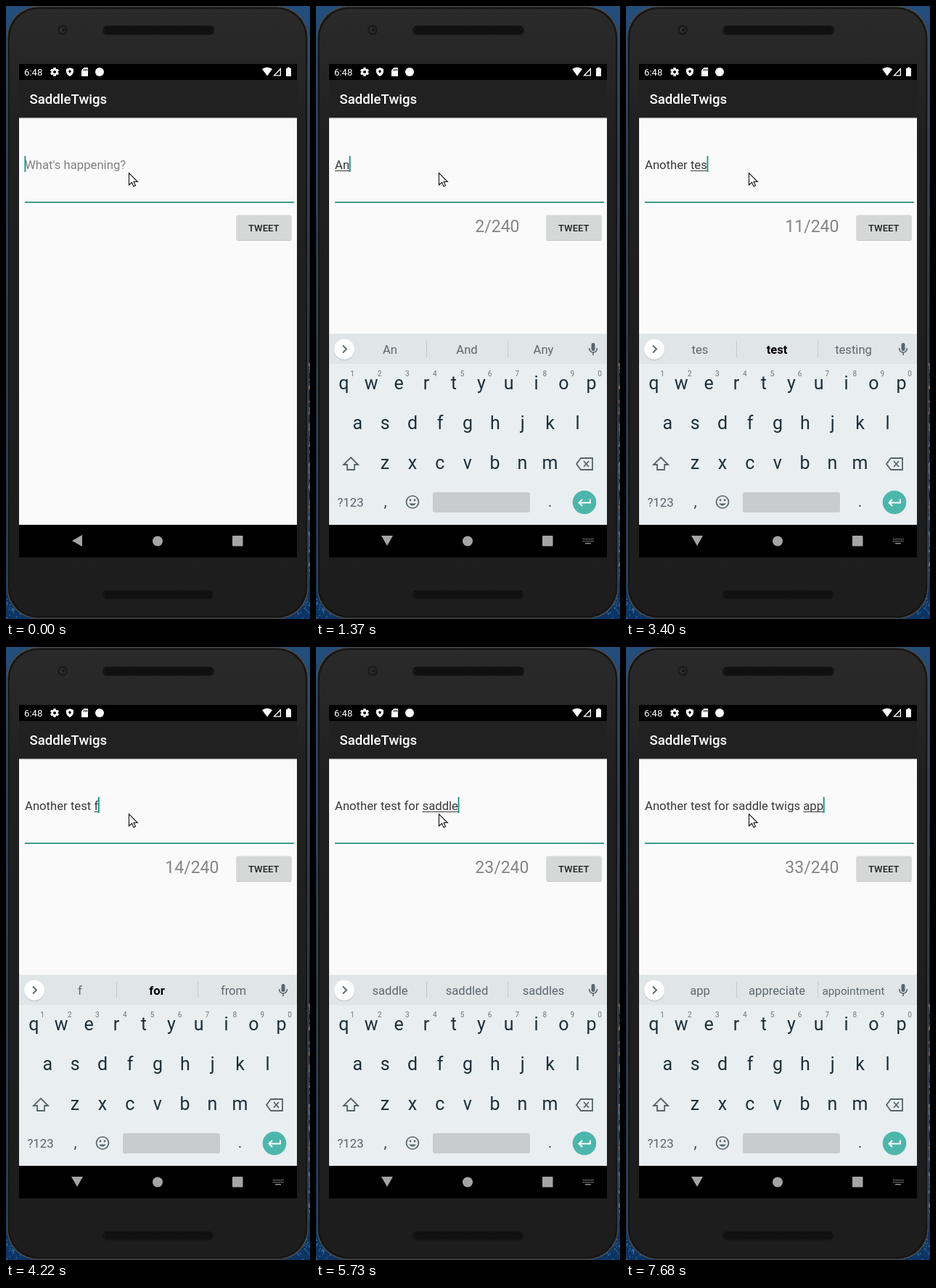
An HTML page with a canvas that plays this animation: 419x846 px, repeating every 8000 ms.

```html
<!DOCTYPE html>
<html lang="en">
<head>
<meta charset="utf-8">
<title>Compose screen</title>
<style>
html, body { margin: 0; width: 100%; height: 100%; overflow: hidden; background: #111; }
canvas { display: block; width: 419px; height: 846px; }
</style>
</head>
<body>
<canvas id="stage" width="419" height="846"></canvas>
<script>
const canvas = document.getElementById('stage');
let ctx = canvas.getContext('2d');
const LOOP = 8000;
const TAU = Math.PI * 2;
const MESSAGE = 'Another test for saddle twigs app';

// time, typed length, three suggestions (* marks the bold one)
const TYPING = [
  [1210, 1, 'A I And'],
  [1370, 2, 'An And Any'],
  [1830, 3, 'Ano *Another Anyone'],
  [2000, 4, 'Anot *Another Anothers'],
  [2150, 5, 'Anoth *Another Anothers'],
  [2300, 6, 'Anothe *Another Anothers'],
  [2450, 7, 'Another Anotha Anothers'],
  [2600, 7, 'Another Anthem Anothers'],
  [2760, 8, 'one day thing'],
  [2940, 9, 't time thing'],
  [3170, 10, 'te *the team'],
  [3400, 11, 'tes *test testing'],
  [3770, 12, 'test tests testing'],
  [3920, 13, 'is for and'],
  [4220, 14, 'f *for from'],
  [4370, 15, 'fo *for found'],
  [4500, 16, 'for forget form'],
  [4670, 17, 'the me you'],
  [4820, 18, 's *sure some'],
  [4970, 19, 'sa *say same'],
  [5150, 20, 'sad sadly saddle'],
  [5330, 21, 'sadd *sad saddle'],
  [5530, 22, 'saddl *saddle saddles'],
  [5730, 23, 'saddle saddled saddles'],
  [6000, 24, 'and is for'],
  [6150, 25, 't to the'],
  [6300, 26, 'tw *two twice'],
  [6580, 27, 'twi *the twenty'],
  [6760, 28, 'twig twigs twin'],
  [6950, 29, 'twigs twig twins'],
  [7140, 30, 'and are in'],
  [7330, 31, 'a and are'],
  [7520, 32, 'ap *app apple'],
  [7680, 33, 'app appreciate appointment']
];
const SLIDE = [80, 130, 180, 230, 260, 320, 400];

function rect(x, y, w, h, color) {
  ctx.fillStyle = color;
  ctx.fillRect(x, y, w, h);
}

function round(x, y, w, h, r, color) {
  ctx.fillStyle = color;
  ctx.beginPath();
  ctx.roundRect(x, y, w, h, r);
  ctx.fill();
}

function disc(x, y, r, color) {
  ctx.fillStyle = color;
  ctx.beginPath();
  ctx.arc(x, y, r, 0, TAU);
  ctx.fill();
}

function trace(d, x, y, color, width) {
  const path = new Path2D(d);
  ctx.save();
  ctx.translate(x, y);
  if (width) {
    ctx.strokeStyle = color;
    ctx.lineWidth = width;
    ctx.stroke(path);
  } else {
    ctx.fillStyle = color;
    ctx.fill(path, 'evenodd');
  }
  ctx.restore();
}

function text(s, x, y, size, color, align = 'left', weight = 400) {
  ctx.font = `${weight} ${size}px Roboto, sans-serif`;
  ctx.textAlign = align;
  ctx.fillStyle = color;
  ctx.fillText(s, x, y);
}

function random(seed) {
  return () => (seed = (seed * 16807) % 2147483647) / 2147483647;
}

function speaker(x, y, w, h) {
  round(x, y, w, h, 6, '#151515');
  for (let row = 0; row < 4; row++) {
    for (let col = 0; col < 49; col++) {
      rect(x + 4 + col * 3 + (row % 2) * 1.5, y + 2 + row * 2.5, 1.3, 1.2, '#030303');
    }
  }
}

function phoneBody() {
  const wall = ctx.createLinearGradient(0, 0, 0, 846);
  wall.addColorStop(0, '#234e7c');
  wall.addColorStop(0.55, '#10253d');
  wall.addColorStop(1, '#0c3565');
  rect(0, 0, 419, 846, wall);
  const rnd = random(77);
  for (let i = 0; i < 90; i++) {
    const tone = rnd() < 0.4 ? '#8b5a4d' : '#3c78a8';
    rect(417 + rnd() * 2, 490 + rnd() * 300, 1.5, 2 + rnd() * 3, tone);
  }
  for (let i = 0; i < 60; i++) {
    rect((rnd() < 0.5 ? 0 : 400) + rnd() * 19, 815 + rnd() * 31, 1.5, 1.5, '#3974a4');
  }
  round(1, 0, 416, 846, 43, '#4a4a4a');
  round(2.5, 1.5, 413, 843, 42, '#151515');
  const shell = ctx.createLinearGradient(0, 0, 0, 846);
  shell.addColorStop(0, '#2a2a2a');
  shell.addColorStop(0.1, '#262626');
  shell.addColorStop(0.2, '#202020');
  shell.addColorStop(1, '#1d1d1d');
  round(5, 4, 408, 838, 40, shell);
  disc(78, 33, 7, '#1b1b1b');
  disc(78, 33, 4, '#303030');
  disc(79, 33, 2.3, '#171717');
  speaker(133, 27, 154, 13);
  speaker(133, 806, 153, 13);
}

function gear(x, y) {
  ctx.fillStyle = '#fff';
  for (let i = 0; i < 3; i++) {
    ctx.save();
    ctx.translate(x, y);
    ctx.rotate(i * Math.PI / 3);
    ctx.fillRect(-1.7, -6, 3.4, 12);
    ctx.restore();
  }
  disc(x, y, 4.4, '#fff');
  disc(x, y, 2, '#000');
}

function statusBar() {
  rect(18, 80, 383, 22, '#000');
  text('6:48', 25, 96, 13.2, '#fff');
  gear(67, 91);
  trace('M0-6L5-4V0Q4 4 0 6Q-4 4-5 0V-4Z', 88, 91, '#fff');
  trace('M0-3L2-1L0 2L-2-1Z', 88, 91, '#000');
  trace('M-1-6H4.5V6H-4.5V-2.5Z', 108.5, 91, '#fff');
  for (let i = 0; i < 3; i++) rect(107 + i * 2, 87, 1, 2.5, '#000');
  disc(129, 91, 6, '#fff');
  trace('M-7-4Q0-9 7-4L0 5.5Z', 360, 91, '#fff');
  trace('M5-6V5.5H-6ZM3.7-2.5L-3 4.3H3.7Z', 374, 91, '#fff');
  trace('M-3.5-5H-1.5V-6.5H1.5V-5H3.5V6H-3.5Z', 389.5, 91, '#fff');
}

function appFrame() {
  rect(18, 154, 383, 562, '#fafafa');
  rect(18, 102, 383, 52, '#212121');
  rect(18, 154, 383, 1, '#a9a9a9');
  rect(18, 155, 383, 1, '#e6e6e6');
  text('SaddleTwigs', 32.5, 135, 18.6, '#fff', 'left', 500);
  rect(26, 270, 371, 1.7, '#208b78');
  round(317.5, 289, 76, 35, 2, '#c3c4c4');
  round(317.5, 288.5, 76, 34.5, 2, '#d6d7d7');
  text('TWEET', 355.3, 310.7, 13.1, '#202122', 'center', 500);
}

function navBar(turn, withKeyboard) {
  rect(18, 716, 383, 45, '#000');
  ctx.save();
  ctx.translate(98, 738);
  ctx.rotate(turn * Math.PI / 2);
  trace('M-8-7H8L0 7Z', 0, 0, '#a5a5a5');
  ctx.restore();
  disc(209, 738.5, 7, '#a5a5a5');
  round(312, 731, 14.5, 14.5, 1, '#a5a5a5');
  if (!withKeyboard) return;
  for (let i = 0; i < 7; i++) {
    rect(368 + i * 2.2, 735, 1.3, 1.4, '#969696');
    rect(368 + i * 2.2, 738, 1.3, 1.4, '#969696');
  }
  rect(371, 741, 8, 1.4, '#969696');
}

function toolbar() {
  const gray = '#66747a';
  ctx.strokeStyle = gray;
  ctx.lineWidth = 2;
  ctx.beginPath();
  ctx.arc(89, 472, 5, 0, TAU);
  ctx.stroke();
  trace('M3 3L9 9', 89, 472, gray, 2.3);
  trace('M-6-7H7V2L2 7H-6Q-7 7-7 6V-6Q-7-7-6-7ZM7 2H2V7M-3-3V-1M3-3V-1M-3 2Q0 5 2 2', 146, 474, gray, 1.6);
  trace('M-2.5-4H-9V4H-3V0H-6M0-5V5M4 5V-4H10M4 0H9', 202, 474, gray, 2);
  round(251, 466, 16, 16, 2, gray);
  rect(293, 464, 1, 21, '#cbd1d4');
  for (let i = -1; i < 2; i++) disc(327.5 + i * 6, 474, 2, gray);
}

function suggestions(words) {
  rect(152, 462, 1, 23, '#c3cacd');
  rect(264, 462, 1, 23, '#c3cacd');
  words.split(' ').forEach((word, i) => {
    const bold = word[0] === '*';
    const label = bold ? word.slice(1) : word;
    ctx.font = '400 16.6px Roboto, sans-serif';
    const size = 16.6 * Math.min(1, 86 / ctx.measureText(label).width);
    text(label, [102, 208, 313.5][i], 480, size, bold ? '#000' : '#5b686e', 'center', bold ? 700 : 400);
  });
}

function keyRow(keys, x, y) {
  [...keys].forEach((key, i) => text(key, x + i * 37.9, y, 25, '#1c3039', 'center'));
}

function keyboard(words) {
  const gray = '#55646b';
  rect(18, 453, 383, 263, '#e9eef1');
  rect(18, 453, 383, 41, '#e0e5e8');
  rect(18, 452, 383, 1, '#eceeef');
  disc(39, 475, 14.5, '#ced3d6');
  disc(39, 473.7, 14, '#fff');
  trace(words ? 'M-2-5L3 0L-2 5' : 'M2-5L-3 0L2 5', 39, 473.5, '#59666c', 1.9);
  if (words) suggestions(words);
  else toolbar();

  round(379.5, 465, 5, 11, 2.5, '#59666c');
  trace('M-5.5-1Q-5 5 0 5Q5 5 5.5-1M0 5V9', 382, 473, '#59666c', 1.6);

  keyRow('qwertyuiop', 38.3, 529);
  keyRow('asdfghjkl', 57.3, 584);
  keyRow('zxcvbnm', 95, 639);
  [...'1234567890'].forEach((n, i) => text(n, 50 + i * 37.9, 511, 10, '#6a767c', 'center'));

  trace('M0-9L10 1H5V8H-5V1H-10Z', 48, 632, gray, 1.8);
  trace('M-5-8H11V8H-5L-11 0ZM-1-4L6 4M6-4L-1 4', 370, 632, gray, 1.8);
  text('?123', 47.5, 691, 16.8, gray, 'center');
  text(',', 95.5, 691, 21, '#34474f', 'center');
  ctx.strokeStyle = gray;
  ctx.lineWidth = 1.7;
  ctx.beginPath();
  ctx.arc(133, 684.5, 8.5, 0, TAU);
  ctx.stroke();
  disc(130, 682, 1.4, gray);
  disc(136, 682, 1.4, gray);
  trace('M-5 2Q0 8 5 2Z', 133, 684.5, gray);
  round(161, 671, 134, 28, 3, '#c8ccce');
  text('.', 322.5, 691, 21, '#34474f', 'center');
  disc(370, 685, 16.3, '#4db6ac');
  trace('M8-5V0H-7M-3-4.5L-7.5 0L-3 4.5', 370, 685.5, '#fff', 2);
}

function field(typed, t) {
  const size = 16.7;
  if (typed) {
    text(typed, 26, 225, size, '#3a3a3a');
    text(`${typed.length}/240`, 219.3, 312, 23, '#858585');
  } else {
    text("What's happening?", 26, 225, size, t < 80 ? '#808080' : '#9d9d9d');
  }
  ctx.font = `400 ${size}px Roboto, sans-serif`;
  const end = 26 + ctx.measureText(typed).width;
  const start = typed.lastIndexOf(' ') + 1;
  if (start < typed.length) {
    const from = 26 + ctx.measureText(typed.slice(0, start)).width;
    rect(from, 227, end - from, 1, '#3a3a3a');
  }
  if (t < 560 || t >= 1060) rect(end - (typed ? 0.3 : 0.5), 207, 1.8, 22, '#0d9284');
}

function pointer() {
  const arrow = 'M0 0V16.5L4 13L6.5 18.5L9 17.3L6.6 12H11.8Z';
  trace(arrow, 169.5, 230.5, '#fff');
  trace(arrow, 169.5, 230.5, '#111', 1.1);
}

// The unchanging parts are painted once.
const backdrop = document.createElement('canvas');
backdrop.width = 419;
backdrop.height = 846;
const screen = ctx;
ctx = backdrop.getContext('2d');
phoneBody();
statusBar();
appFrame();
ctx = screen;

function draw(t) {
  const step = TYPING.findLast(s => s[0] <= t);
  const typed = step ? MESSAGE.slice(0, step[1]) : '';
  const shown = t >= 80;
  const held = t < 400 ? SLIDE.findLast(s => s <= t) || 0 : 400;
  const rest = shown ? (1 - (held - 80) / 320) ** 2.6 : 1;

  ctx.drawImage(backdrop, 0, 0);
  field(typed, t);
  navBar(rest, shown);
  if (shown) {
    const shift = 34 * rest;
    ctx.save();
    ctx.beginPath();
    ctx.rect(18, 154, 383, 562 + Math.min(shift, 7));
    ctx.clip();
    ctx.globalAlpha = Math.min(1, 0.2 + (held - 80) / 205);
    if (shift > 0.5) rect(18, 716, 383, 7, '#c6cacc');
    ctx.translate(0, shift);
    keyboard(step && step[2]);
    ctx.restore();
    if (shift > 0.5) rect(18, 716, 383, Math.min(shift, 7), '#c6cacc');
  }
  pointer();
}

function tick(now) {
  draw(now % LOOP);
  requestAnimationFrame(tick);
}
requestAnimationFrame(tick);
</script>
</body>
</html>
```
